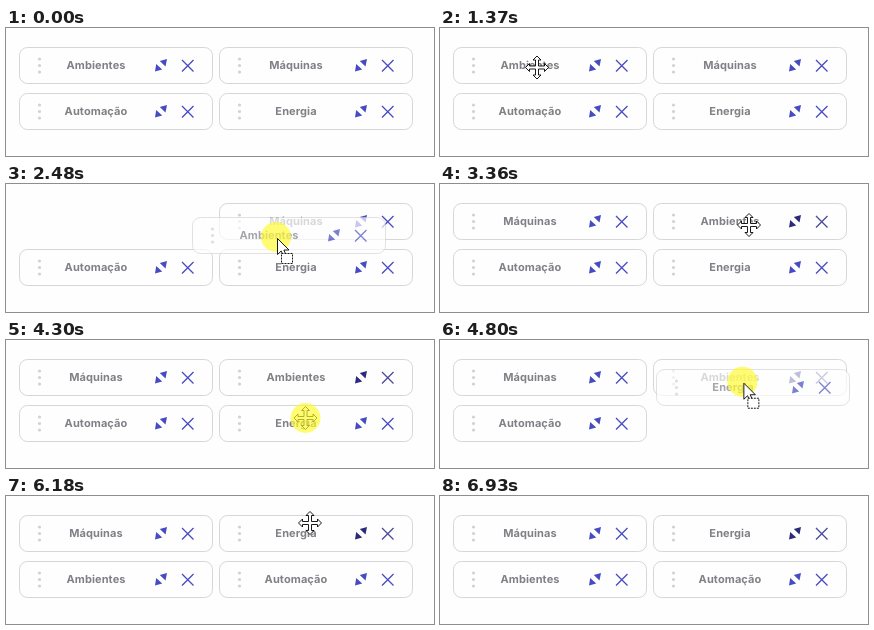
Recreate the animation shown at these times as an HTML page. Size 428x128 px, loop 7590 ms.

```html
<!DOCTYPE html>
<html lang="pt">
<head>
<meta charset="utf-8">
<title>Reordenar blocos</title>
<style>
  html, body { margin: 0; width: 100%; height: 100%; overflow: hidden; background: #fefefe; }
  svg { display: block; }
  .card { fill: #fefefe; stroke: #d6d6d8; }
  .label {
    font: 700 11px Inter, "Open Sans", sans-serif; letter-spacing: .1px;
    fill: #808086; text-anchor: middle; text-rendering: geometricPrecision;
  }
  .grip { fill: #d2d2d4; }
  .expand { fill: #464bc2; }
  .close { fill: none; stroke: #464bc2; stroke-width: 1.3; }
  .dropped .expand { fill: #2d2a7c; }
  .dropped .close { stroke: #4a4a98; }
  .dragged { opacity: .7; }
  .press { fill: #fffb30; opacity: .68; }
  .cursor { fill: #fff; stroke: #000; stroke-width: .9; }
</style>
</head>
<body>
<svg width="428" height="128" viewBox="0 0 428 128">
  <g id="tiles"></g>
  <g id="move" class="cursor"></g>
  <circle id="press" class="press" r="15"/>
  <g id="arrow" class="cursor">
    <path d="M1.5 1.5V17.5L5.2 14L7.8 20L10.4 18.8L7.9 13H13Z"/>
    <rect id="carry" x="5.5" y="16.5" width="11" height="10" stroke-dasharray="2 1"/>
  </g>
</svg>
<script>
const LOOP = 7590, STEP = 70;
const WIDTH = 194, HEIGHT = 37;
const NAMES = ['Ambientes', 'Máquinas', 'Automação', 'Energia'];

const ENTRY = [325, 130];
const MOVES = [
  { start: 330, end: 1020, to: [145, 42] },
  { start: 1090, end: 1370, to: [97, 39.5] },
  { start: 1700, end: 2480, to: [270, 53] },
  { start: 2550, end: 2760, to: [311, 42] },
  { start: 3360, end: 3360, to: [309, 41] },
  { start: 3620, end: 4100, to: [299.5, 78] },
  { start: 4370, end: 5060, to: [304, 21] },
  { start: 5390, end: 5530, to: [304, 27] },
  { start: 6510, end: 6930, to: [336, 142] }
];

const DRAGS = [
  { tile: 0, slot: 1, press: 1630, swap: 2620, drop: 3360 },
  { tile: 3, slot: 1, press: 4300, swap: 4930, drop: 5850 }
];

const byId = id => document.getElementById(id);
const layer = byId('tiles');
const place = (el, x, y) => el.setAttribute('transform', `translate(${x} ${y})`);
const show = (el, on) => { el.style.display = on ? '' : 'none'; };
const slotAt = i => [13 + 200 * (i % 2), 19 + 46 * Math.floor(i / 2)];

// One quarter of the four-way arrow, turned about its centre.
const quarter = [[-1.5, -1.5], [-1.5, -7.5], [-4, -7.5], [0, -11.5], [4, -7.5], [1.5, -7.5]];
const turn = ([x, y], n) => n ? turn([-y, x], n - 1) : [x, y];
const outline = [0, 1, 2, 3].flatMap(n => quarter.map(p => turn(p, n)));
byId('move').innerHTML = `<polygon points="${outline.join(' ')}"/>`;

const tiles = NAMES.map(name => {
  const g = document.createElementNS('http://www.w3.org/2000/svg', 'g');
  g.innerHTML = `
    <rect class="card" x=".5" y=".5" width="${WIDTH - 1}" height="${HEIGHT - 1}" rx="8"/>
    ${[12, 18.5, 25].map(y => `<circle class="grip" cx="20.5" cy="${y}" r="1.6"/>`).join('')}
    <text class="label" x="77" y="22">${name}</text>
    <path class="expand" d="M148 12L140.8 14L146.5 19.5ZM136 24.5L137.2 17L143.2 22.5Z"/>
    <path class="close" d="M163 13L174.5 24.5M174.5 13L163 24.5"/>`;
  return layer.appendChild(g);
});

// The pointer advances in equal hops, the first one at the start of each move.
function pointerAt(t) {
  let pos = ENTRY;
  for (const { start, end, to } of MOVES) {
    if (t < start) break;
    const hops = Math.round((end - start) / STEP) + 1;
    const k = Math.min(1, (Math.floor((t - start) / STEP) + 1) / hops);
    pos = pos.map((v, i) => v + (to[i] - v) * k);
  }
  return pos;
}

function orderAt(t) {
  const order = NAMES.map((_, i) => i);
  for (const { tile, slot, swap } of DRAGS) {
    if (t < swap) break;
    order.splice(order.indexOf(tile), 1);
    order.splice(slot, 0, tile);
  }
  return order;
}

function liftedAt({ tile, press }, pos) {
  const home = slotAt(orderAt(press).indexOf(tile));
  const grip = pointerAt(press);
  return pos.map((v, i) => Math.round(v - grip[i] + home[i]));
}

const overTile = (x, y) => NAMES.some((_, i) => {
  const [sx, sy] = slotAt(i);
  return x >= sx && x <= sx + WIDTH && y >= sy && y <= sy + HEIGHT;
});

function paint(t) {
  const pos = pointerAt(t);
  const pressed = DRAGS.find(d => t >= d.press && t < d.drop);
  const drag = pressed && t >= pressed.press + STEP ? pressed : null;
  const latest = DRAGS.findLast(d => t >= d.swap);

  orderAt(t).forEach((id, slot) => {
    const tile = tiles[id];
    const lifted = drag?.tile === id;
    const dropped = latest?.tile === id && t >= latest.drop;
    tile.setAttribute('class', lifted ? 'dragged' : dropped ? 'dropped' : '');
    place(tile, ...(lifted ? liftedAt(drag, pos) : slotAt(slot)));
    if (lifted && layer.lastChild !== tile) layer.append(tile);
  });

  const moving = !drag && overTile(...pos);
  show(byId('move'), moving);
  show(byId('arrow'), !moving);
  show(byId('carry'), drag);
  show(byId('press'), pressed);
  for (const id of ['move', 'arrow', 'press']) place(byId(id), ...pos);
}

const begin = performance.now();
function tick() {
  paint((performance.now() - begin) % LOOP);
  requestAnimationFrame(tick);
}
tick();
</script>
</body>
</html>
```
